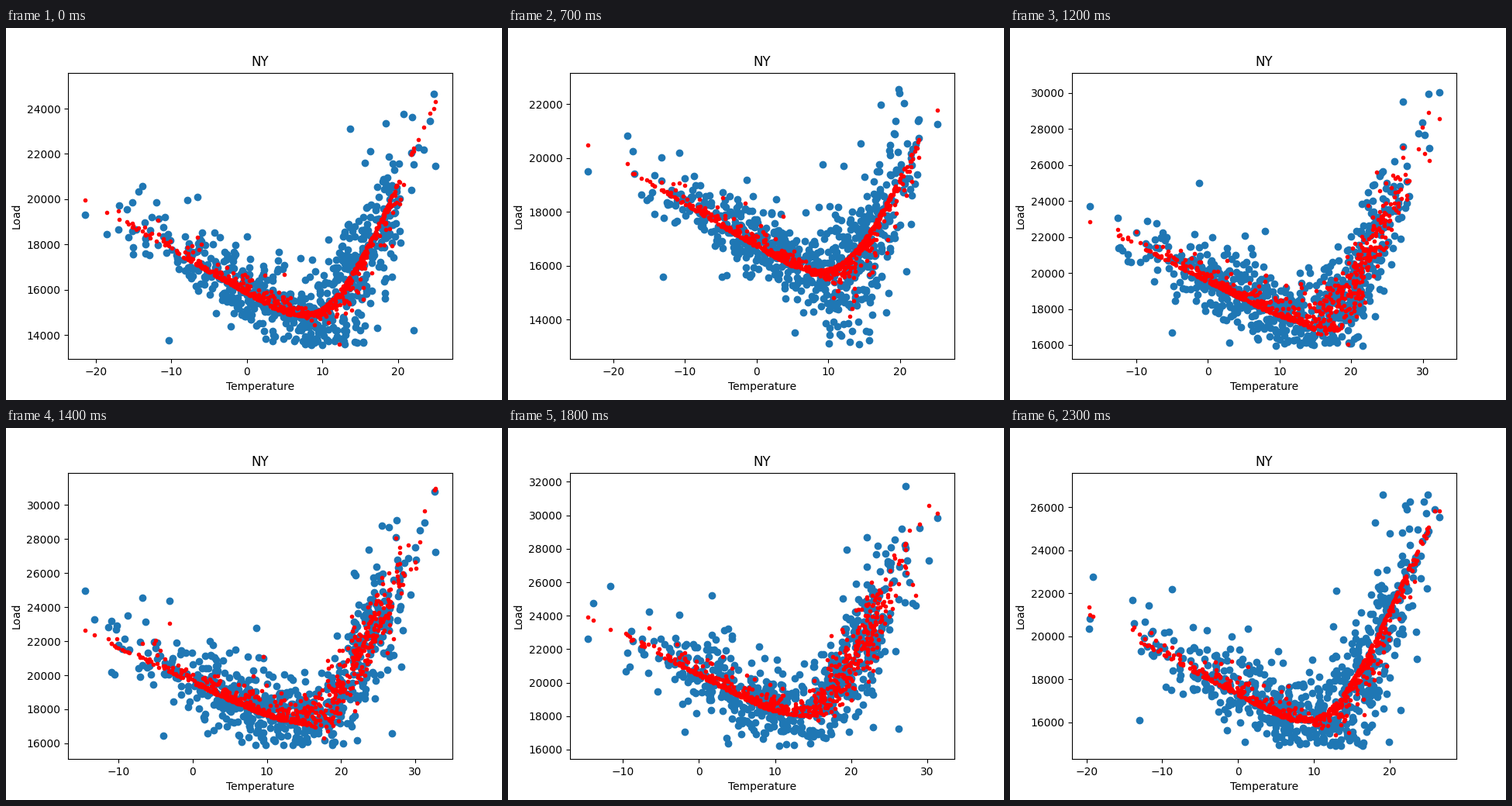
A matplotlib script for the animation above (2400 ms loop, 640 by 480 pixels).

```python
import numpy as np
import matplotlib.pyplot as plt
from matplotlib.animation import FuncAnimation

HOURS = 24
DAYS = 640
LEFT, RIGHT, TOP, BOTTOM = 80, 576, 57.6, 427.2   # axes edges in pixels
X_MIN, X_MAX, Y_MIN, Y_MAX = 102.5, 553.5, 74.4, 410.4   # data inside 5 % margins
WIDTH = .05                                       # softness of the bend

# Key hours: axis limits, then the fitted curve as
# height of the cold end, slope of the cold side, place of the bend
KEYS = {
    0: (-23.69, 27.18, 12932, 25589, 219, 263, .70),
    4: (-21.50, 26.43, 11596, 21419, 179, 333, .67),
    7: (-26.05, 27.57, 12527, 23163, 150, 268, .74),
    12: (-19.00, 34.70, 15216, 31137, 246, 230, .695),
    16: (-14.64, 35.33, 14935, 32667, 275, 192, .65),
    18: (-16.93, 33.56, 15435, 32551, 241, 235, .65),
    23: (-21.90, 28.78, 14299, 27618, 238, 245, .695),
}

rng = np.random.default_rng(11)
SEASON = np.cos(rng.uniform(0, 2 * np.pi, DAYS))  # 1 winter, -1 summer
TEMP, FIT = rng.standard_normal((2, DAYS))
LOAD = rng.standard_t(5, DAYS)


def blend(hour):
    return [np.interp(hour, list(KEYS), col) for col in zip(*KEYS.values())]


def fold(y):
    """Mirror stray values back into the data area."""
    y = Y_MIN + np.abs(y - Y_MIN)
    return Y_MAX - np.abs(Y_MAX - y)


def curve(u, start, slope, bend):
    """Straight cold side that bends softly into a steep warm side."""
    steep = (start + slope - 103) / (1 - bend)
    return start + slope * u - steep * WIDTH * np.logaddexp(0, (u - bend) / WIDTH)


def hour_points(hour, shape):
    """Pixel positions of temperature, load and fitted load."""
    rng = np.random.default_rng(100 + hour)
    warm, kick, jitter = rng.standard_normal((3, DAYS))
    day = np.interp(hour, [0, 7, 12, 18, 23], [0, 0, 1, 1, 0])

    winter = .44 - .07 * day
    u = (winter + .82 - (.82 - winter) * SEASON) / 2
    u = u - (.82 - winter) / 2 * 0 + (.095 + .04 * SEASON) * (.85 * TEMP + .5 * warm)
    u = (u - u.min()) / (u.max() - u.min())
    hot = np.clip((u - .58) / .15, 0, 1)

    n = .7 * FIT + .7 * kick
    fit = curve(u, *shape) + 4 * day * n
    fit += (1 - hot) * (3 - 5 * n ** 2)
    fit += hot * ((6 + 14 * day) * n + (1 - day) * (9 * n ** 2 - 7))

    spread = 20 + hot * (22 - 10 * day)
    load = fit + spread * (.8 * LOAD + .6 * jitter)
    return X_MIN + (X_MAX - X_MIN) * u, fold(load), fold(fit)


fig, ax = plt.subplots(figsize=(6.4, 4.8), dpi=100)
loads, = ax.plot([], [], "o", color="tab:blue")
fits, = ax.plot([], [], "r.")
ax.set_title("NY")
ax.set_xlabel("Temperature")
ax.set_ylabel("Load")


def update(hour):
    x0, x1, y0, y1, *shape = blend(hour)
    x, load, fit = hour_points(hour, shape)
    temp = x0 + (x - LEFT) / (RIGHT - LEFT) * (x1 - x0)
    for dots, y in ((loads, load), (fits, fit)):
        dots.set_data(temp, y0 + (BOTTOM - y) / (BOTTOM - TOP) * (y1 - y0))
    ax.set_xlim(x0, x1)
    ax.set_ylim(y0, y1)
    return loads, fits


anim = FuncAnimation(fig, update, frames=HOURS, interval=100, repeat=True)
plt.show()
```
